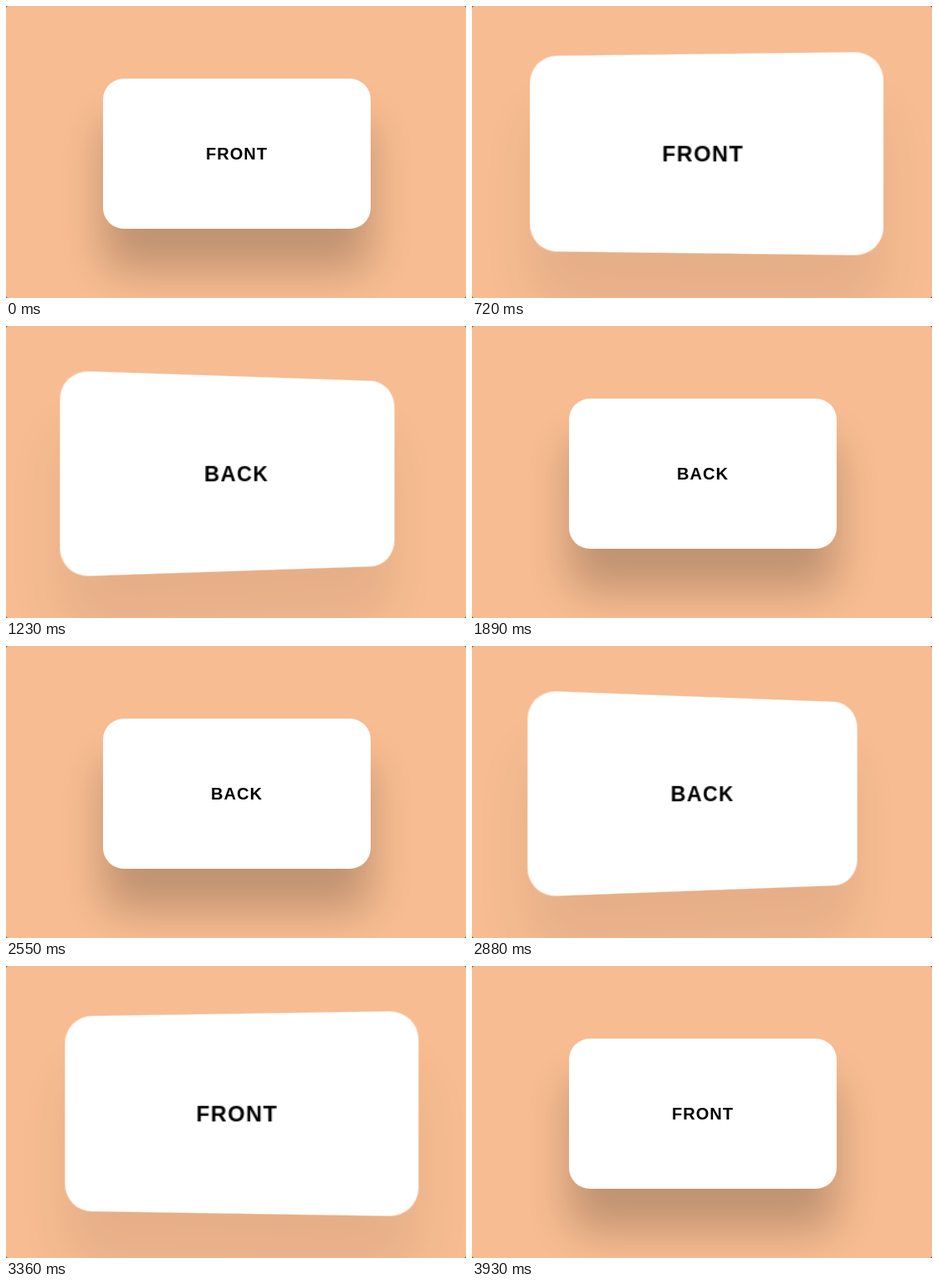
An HTML page that plays this animation: 550 by 350 pixels, repeating every 3.96 s.

```html
<!DOCTYPE html>
<html lang="en">
<head>
<meta charset="utf-8">
<title>Card flip</title>
<style>
  html, body { margin: 0; width: 100%; height: 100%; overflow: hidden; background: #57473d; }
  .stage {
    position: absolute; left: 0; top: 0; width: 550px; height: 350px;
    overflow: hidden; border-radius: 3px; background: #f7bc91;
    perspective: 1000px; perspective-origin: 276px 177px;
  }
  .card {
    position: absolute; left: 116px; top: 87px; width: 320px; height: 180px;
    transform-style: preserve-3d;
  }
  .face {
    position: absolute; inset: 0; border-radius: 25px; background: #fff; color: #000;
    font: bold 20px/180px "Liberation Sans", Arial, sans-serif;
    letter-spacing: 1px; text-align: center;
    backface-visibility: hidden;
  }
  .back { transform: rotateY(180deg); }
</style>
</head>
<body>
<div class="stage">
  <div class="card">
    <div class="face">FRONT</div>
    <div class="face back">BACK</div>
  </div>
</div>
<script>
  const LOOP = 3960, QUARTER = 282;
  const LIFT = 1.337, TILT = 6;
  const starts = [500, 2563];

  const pose = (scale, angle) => `scale3d(${scale},${scale},${scale}) rotateY(${angle}deg)`;
  const shadow = alpha => `0 50px 50px rgba(0,0,0,${alpha})`;
  const REST = shadow(0.22), RAISED = shadow(0.07);

  // Each flip: lift, turn edge-on while dipping, lift again, settle.
  const turn = [[1, 0], [LIFT, TILT], [1, 90], [LIFT, 180 - TILT], [1, 180]];
  const shade = [REST, RAISED, RAISED, RAISED, REST];

  const moves = [{ offset: 0, transform: pose(1, 0) }];
  const shades = [{ offset: 0, boxShadow: REST }];

  starts.forEach((start, flip) => {
    turn.forEach(([scale, angle], i) => {
      const offset = (start + i * QUARTER) / LOOP;
      const turned = flip ? angle - 180 : -angle;
      moves.push({ offset, easing: 'ease', transform: pose(scale, turned) });
      shades.push({ offset, easing: 'ease', boxShadow: shade[i] });
    });
  });

  // The second flip swings back from the reverse side to the front.
  moves.push({ offset: 1, transform: pose(1, 0) });
  shades.push({ offset: 1, boxShadow: REST });

  const timing = { duration: LOOP, iterations: Infinity };
  document.querySelector('.card').animate(moves, timing);
  document.querySelectorAll('.face').forEach(face => face.animate(shades, timing));
</script>
</body>
</html>
```
